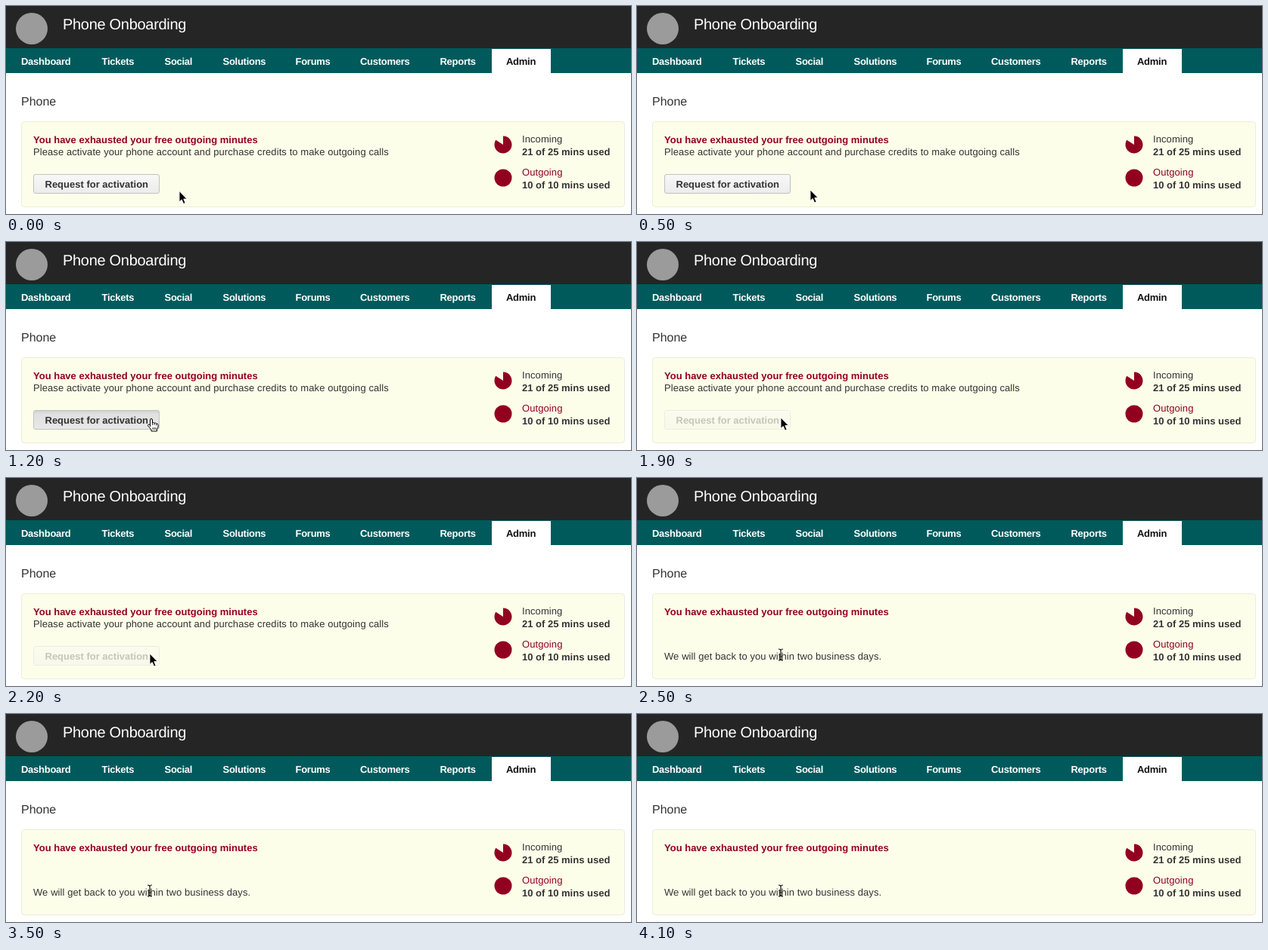
An HTML page that plays this animation: 826x276 px, repeating every 4200 ms.

```html
<!DOCTYPE html>
<html lang="en">
<head>
<meta charset="utf-8">
<title>Phone Onboarding</title>
<style>
  html, body { margin: 0; width: 100%; height: 100%; overflow: hidden; background: #fff; }
  svg { display: block; width: 826px; height: 276px; }
  text { font: 13px "Liberation Sans", Arial, sans-serif; fill: #333; text-rendering: geometricPrecision; }
  .bold { font-weight: 700; }
  .body { letter-spacing: .085px; }
  .red { fill: #92001f; }
  .title { font-size: 20px; letter-spacing: -.3px; fill: #fff; }
  .heading { font-size: 16px; }
  .nav text { font-weight: 700; letter-spacing: -.27px; fill: #fff; }
  .nav text.active { fill: #111; }
</style>
</head>
<body>
<svg viewBox="0 0 826 276">
  <defs>
    <linearGradient id="idle" x2="0" y2="1">
      <stop stop-color="#f8f8f8"/><stop offset="1" stop-color="#ececec"/>
    </linearGradient>
    <linearGradient id="pressed" x2="0" y2="1">
      <stop stop-color="#cfcfcf"/><stop offset=".18" stop-color="#e0e0e0"/><stop offset="1" stop-color="#e8e8e8"/>
    </linearGradient>
  </defs>

  <rect width="826" height="56" fill="#252525"/>
  <circle cx="34" cy="30" r="21" fill="#9b9b9b"/>
  <text class="title" x="75" y="31">Phone Onboarding</text>

  <rect y="56" width="826" height="33" fill="#005a5c"/>
  <rect x="642" y="57" width="78" height="32" fill="#fff"/>
  <g class="nav" id="nav"></g>

  <text class="heading" x="20" y="132">Phone</text>
  <rect x="20.5" y="153.5" width="797" height="113" rx="4" fill="#fdfeea" stroke="#ebedd9"/>
  <text class="bold red" x="36" y="182">You have exhausted your free outgoing minutes</text>

  <g id="request">
    <text class="body" x="36" y="198">Please activate your phone account and purchase credits to make outgoing calls</text>
    <g id="button">
      <rect id="face" x="36.5" y="223.5" width="166" height="25" rx="2.5" stroke="#c2c2c2"/>
      <text class="bold" x="51.5" y="241">Request for activation</text>
    </g>
  </g>
  <text id="reply" class="body" x="36" y="241">We will get back to you within two business days.</text>

  <path class="red" d="M657 184V172.5A11.5 11.5 0 1 1 647.3 177.8Z"/>
  <text class="body" x="682" y="181">Incoming</text>
  <text class="bold" x="682" y="198">21 of 25 mins used</text>
  <circle class="red" cx="657" cy="228" r="11.5"/>
  <text class="body red" x="682" y="225">Outgoing</text>
  <text class="bold" x="682" y="242">10 of 10 mins used</text>

  <g id="cursor">
    <path id="arrow" d="M0 0V14.4L3.2 11.5 5.6 17 8.1 15.9 5.8 10.6H10.2Z" fill="#000" stroke="#fff" stroke-width=".9"/>
    <g id="hand" stroke="#000" stroke-linejoin="round">
      <path fill="#fff" d="M-.5 9V2Q-.5.5 1 .5T2.5 2V6Q3.8 5 5 6.3 6.6 5.6 7.6 7 9.7 6.6 10 8.6V12L8.5 14.5V17H1V15L-3.5 9.8Q-3.6 7.9-1.8 8.1L-.5 9V11"/>
      <path fill="none" d="M2.5 6V9M5 6.5V9M7.6 7.2V9.5M3 12V15M5 12V15M7 12V15" stroke-width=".8"/>
    </g>
    <path id="beam" d="M-3-7.5Q0-7.5 0-5.5 0-7.5 3-7.5M0-5.5V5.5M-3 7.5Q0 7.5 0 5.5 0 7.5 3 7.5M-2 2.5H2" fill="none" stroke="#111" stroke-width="1.2"/>
  </g>
</svg>
<script>
const $ = id => document.getElementById(id);
const show = (id, on) => $(id).setAttribute('visibility', on ? 'visible' : 'hidden');

const tabs = { Dashboard: 20, Tickets: 126.5, Social: 209.5, Solutions: 286.5, Forums: 382.5,
               Customers: 468, Reports: 573.5, Admin: 661 };
for (const [label, x] of Object.entries(tabs)) {
  const tab = document.createElementNS('http://www.w3.org/2000/svg', 'text');
  tab.setAttribute('x', x);
  tab.setAttribute('y', 78);
  tab.textContent = label;
  if (label === 'Admin') tab.setAttribute('class', 'active');
  $('nav').append(tab);
}

const LOOP = 4200, STEP = 100;
const PRESS = 1100, DISABLE = 1400, REPLY = 2300;

// Pointer position from each start time: [ms, x, y]
const pointer = [
  [0, 229, 245.5], [100, 229, 245], [300, 229, 244.5], [500, 229, 244], [600, 227, 241.5],
  [700, 219, 238], [800, 205, 236], [900, 195, 235], [1000, 191, 234],
  [DISABLE, 190, 233], [REPLY, 190, 234.5]
];

function draw(now) {
  const t = Math.floor(now % LOOP / STEP) * STEP;
  const [, x, y] = pointer.findLast(([start]) => start <= t);
  const replied = t >= REPLY, disabled = t >= DISABLE;
  const hovering = x < 203 && !disabled;

  show('request', !replied);
  show('reply', replied);
  show('arrow', !replied && !hovering);
  show('hand', hovering);
  show('beam', replied);
  $('button').setAttribute('opacity', disabled ? .27 : 1);
  $('face').setAttribute('fill', t >= PRESS && !disabled ? 'url(#pressed)' : 'url(#idle)');
  $('cursor').setAttribute('transform', `translate(${x} ${y})`);
}

const origin = performance.now();
function tick() {
  draw(performance.now() - origin);
  requestAnimationFrame(tick);
}
tick();
</script>
</body>
</html>
```
